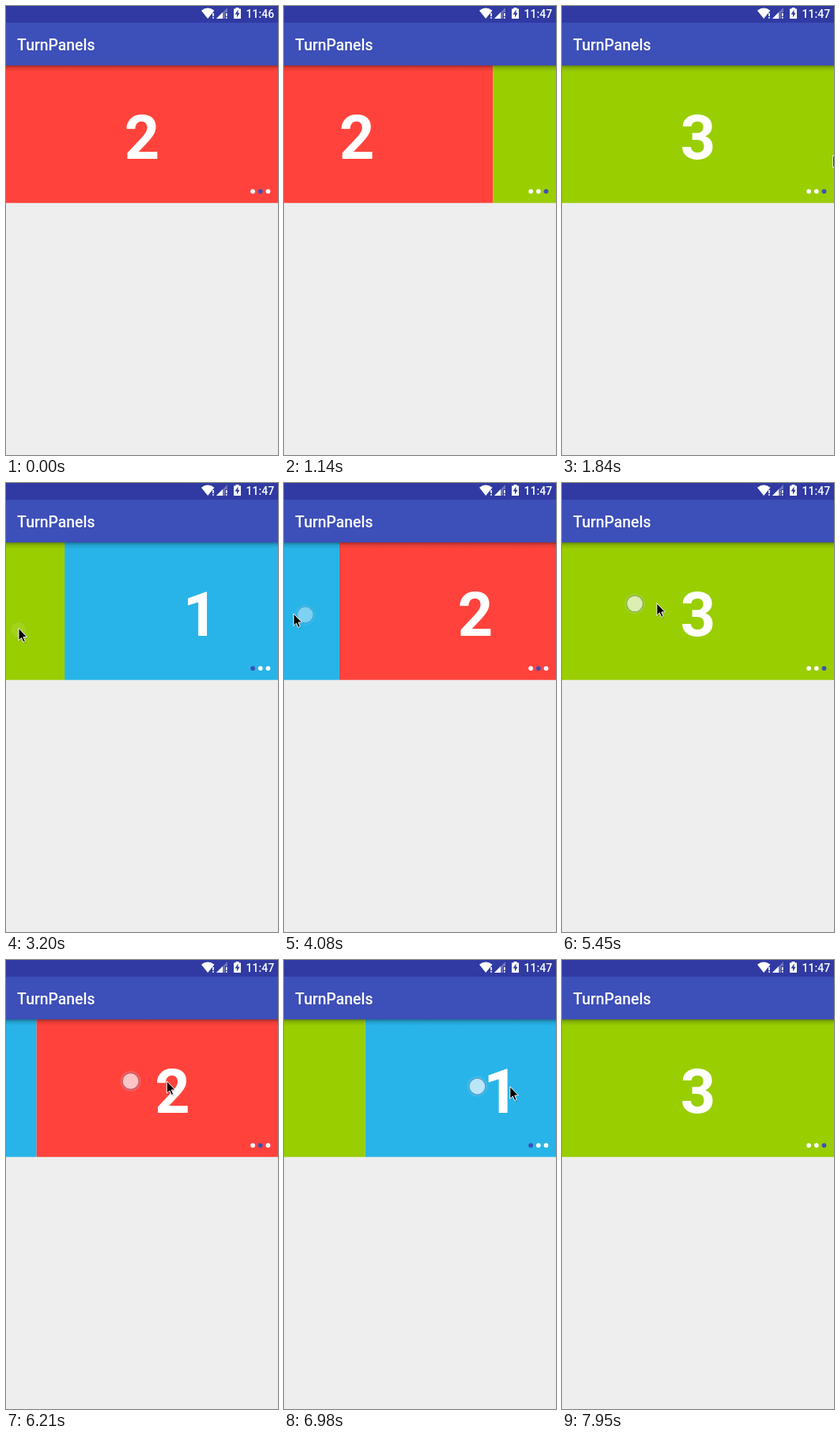
These frames come from a looping animation (344 by 567 pixels, 8.37 s). An HTML page:

```html
<!DOCTYPE html>
<html lang="en">
<head>
<meta charset="utf-8">
<title>Cyclic pager</title>
<style>
  html, body { margin: 0; width: 100%; height: 100%; overflow: hidden; background: #eee; }
  svg { display: block; width: 100vw; height: 100vh; }
  text { font-family: Roboto, sans-serif; fill: #fff; }
  .title { font-size: 19.4px; font-weight: 500; }
  .clock { font-size: 14px; font-weight: 500; }
  .digit { font-size: 77.6px; font-weight: 700; text-anchor: middle; }
</style>
</head>
<body>
<svg viewBox="0 0 344 567">
  <defs>
    <linearGradient id="shade" x2="0" y2="1">
      <stop offset="0" stop-opacity=".36"/>
      <stop offset=".4" stop-opacity=".12"/>
      <stop offset="1" stop-opacity="0"/>
    </linearGradient>
  </defs>

  <rect width="344" height="567" fill="#eee"/>
  <g id="pages"></g>
  <g id="dots"></g>
  <rect y="75" width="344" height="8" fill="url(#shade)"/>

  <rect y="21" width="344" height="54" fill="#3d4fb8"/>
  <rect width="344" height="21" fill="#303aa2"/>
  <text class="title" x="14" y="55.5">TurnPanels</text>

  <g fill="#fff">
    <path d="M247 5.8Q255 -1 263.5 5.8L261 9V9.5H260V10L255.2 16Z"/>
    <path d="M266 16L280 2V8H277V16Z" opacity=".3"/>
    <path d="M266 16L274 8V16Z"/>
    <path id="mark" d="M261.2 9h1.7v4h-1.7zm0 5h1.7v1.8h-1.7z"/>
    <use href="#mark" x="16.8"/>
    <path d="M288 3.5H290.5V2H294.5V3.5H297V16H288Z"/>
    <path d="M293.6 4.6L289.6 10.4H292V14.6L295.6 8.8H293.4Z" fill="#303aa2"/>
  </g>
  <text class="clock" id="clock" x="303.6" y="14.9"></text>

  <g id="touch">
    <circle r="13" fill="#cdd8ff" fill-opacity=".16"/>
    <circle r="10.2" fill="none" stroke="#5a6e90" stroke-opacity=".4" stroke-width="1.2"/>
    <circle r="9.8" fill="#fff" fill-opacity=".64"/>
  </g>
  <g id="cursor">
    <path d="M1 1.5V17.5L4.7 14.1 7.2 19.8 9.7 18.7 7.2 13.1H12Z" opacity=".18"/>
    <path d="M0 .5V16L3.5 12.7 6 18.2 8.4 17.1 6 11.7H10.7Z" stroke="#fff"/>
  </g>
</svg>
<script>
const LOOP = 8370, WIDTH = 344, COLORS = ['#28b4e8', '#ff433c', '#99ce00'];
const AUTO = { start: 1105, duration: 700 };
const LAG = 60, SLOP = 8, FADE = 60, STROKE = 400, HELD = 380, SETTLE = 450;

// Two series of drags: forwards, then backwards
const SERIES = [
  { start: 2770, every: 906, step: 1, from: [254, 301, 301], to: 12 },
  { start: 5360, every: 672, step: -1, from: [88, 111, 134], to: 330 }
];
const swipes = SERIES.flatMap(({ start, every, step, from, to }) =>
  from.map((x, i) => ({ begin: start + i * every, step, from: x, to })));

// Horizontal resting points of the pointer: time, x
const rests = [
  [1770, 352], [2010, 308], [2150, 308], [2380, 67], [2530, 67],
  ...swipes.flatMap(s => [[s.begin - LAG, s.from], [s.begin, s.from], [s.begin + STROKE, s.to]]),
  [7900, 338]
];

const $ = id => document.getElementById(id);
const clamp = v => Math.min(1, Math.max(0, v));
const mod = (a, n) => ((a % n) + n) % n;
const easeOut = v => 1 - (1 - clamp(v)) ** 5;
const smooth = v => clamp(v) ** 2 * (3 - 2 * clamp(v));
const place = (node, x, y) => node.setAttribute('transform', `translate(${x} ${y})`);

function add(parent, tag, attrs, text = '') {
  const node = document.createElementNS('http://www.w3.org/2000/svg', tag);
  for (const key in attrs) node.setAttribute(key, attrs[key]);
  node.textContent = text;
  return parent.appendChild(node);
}

const pages = COLORS.map((fill, i) => {
  const page = add($('pages'), 'g', {});
  add(page, 'rect', { y: 75, width: WIDTH, height: 173.7, fill });
  add(page, 'text', { class: 'digit', x: 172, y: 192.7 }, i + 1);
  return page;
});
const dots = COLORS.map((_, i) =>
  add($('dots'), 'circle', { cx: 312.1 + i * 9.7, cy: 234.1, r: 2.9 }));

function pointerX(t) {
  const next = rests.findIndex(r => r[0] > t);
  if (next < 1) return null;
  const [t0, x0] = rests[next - 1], [t1, x1] = rests[next];
  return x0 + (x1 - x0) * smooth((t - t0) / (t1 - t0));
}

// A shallow arc, then a drop out of the bottom corner
function pointerY(t) {
  const arc = 151 + 5.1 * (t / 1000 - 5.7) ** 2;
  return Math.min(188, arc) + 392 * smooth((t - 7200) / 640);
}

function state(t) {
  let position = 1 + easeOut((t - AUTO.start) / AUTO.duration);
  let selected = t < AUTO.start ? 1 : 2;
  let alpha = 0;
  for (const { begin, step, from } of swipes) {
    if (t < begin) break;
    const release = begin + HELD;
    const distance = (from - pointerX(Math.min(t, release) - LAG)) * step;
    const drag = clamp((distance - SLOP) / WIDTH);
    const settle = easeOut((t - release) / SETTLE);
    position = selected + step * (drag + (1 - drag) * settle);
    if (t >= release) selected += step;
    alpha = clamp((t - begin) / FADE) * clamp(1 - (t - release) / FADE);
  }
  return { position, selected: mod(selected, 3), alpha };
}

function draw(t) {
  const { position, selected, alpha } = state(t);
  pages.forEach((page, i) => place(page, (mod(i - position + 1.5, 3) - 1.5) * WIDTH, 0));
  dots.forEach((dot, i) => dot.setAttribute('fill', i === selected ? '#3b50b8' : '#fff'));
  $('clock').textContent = t < 180 ? '11:46' : '11:47';

  $('touch').setAttribute('opacity', alpha);
  if (alpha) place($('touch'), pointerX(t - LAG), pointerY(t - LAG) + 1);

  const x = pointerX(t);
  $('cursor').setAttribute('visibility', x === null ? 'hidden' : 'visible');
  if (x !== null) place($('cursor'), x, pointerY(t));
}

const start = performance.now();
function tick() {
  draw((performance.now() - start) % LOOP);
  requestAnimationFrame(tick);
}
tick();
</script>
</body>
</html>
```
